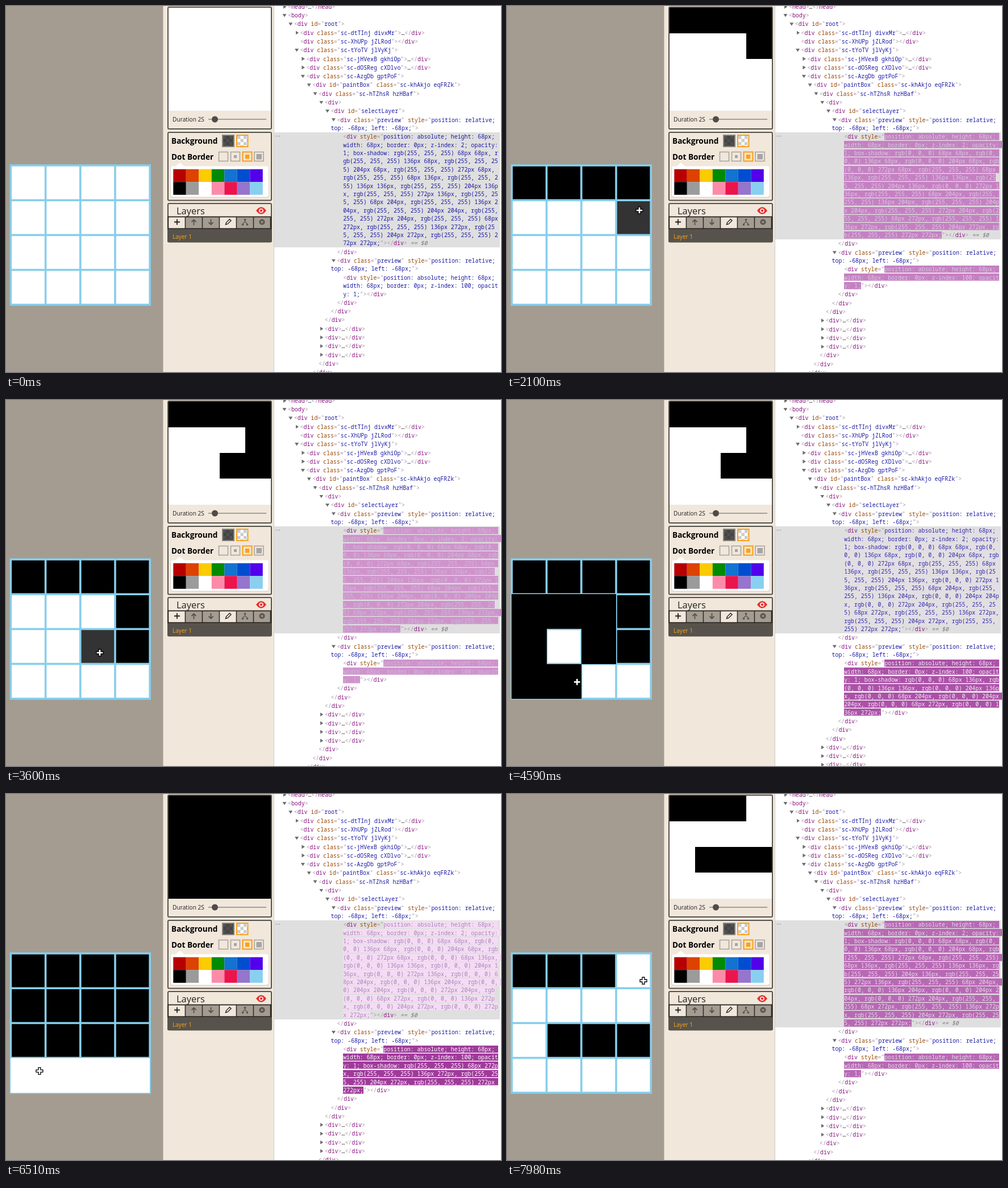
Recreate the animation shown at these times as an HTML page. Size 871x643 px, loop 8000 ms.

```html
<!DOCTYPE html>
<html lang="en">
<head>
<meta charset="utf-8">
<title>Pixel editor with inspector</title>
<style>
html, body { margin: 0; width: 100%; height: 100%; overflow: hidden; background: #fff; }
#stage { position: relative; width: 100%; height: 100%; overflow: hidden; contain: strict; }
#app { position: absolute; left: 0; top: 0; }
#app text { font-family: "Open Sans", "Noto Sans", sans-serif; }
#tree {
  position: absolute; z-index: 0; left: 472px; top: -6.6px; width: 398px;
  font: 9.9px/14.4px "Noto Sans Mono", "DejaVu Sans Mono", monospace;
  white-space: pre-wrap; word-break: break-all; color: #222;
}
.row { position: relative; padding: .45px 0; }
.sel::before { content: ""; position: absolute; z-index: -1; inset: 0 1px 0 0; background: #dfdfdf; }
.sel::after { content: "•••"; position: absolute; left: 2px; top: 0; font-size: 5px; color: #666; }
.flash {
  background: 0 50% / 100% 12.6px no-repeat;
  -webkit-box-decoration-break: clone; box-decoration-break: clone;
}
.arrow { position: absolute; background: #6e6e6e; }
.open { width: 7px; height: 5.5px; margin: 4.8px 0 0 -9.5px; clip-path: polygon(0 0, 100% 0, 50% 100%); }
.shut { width: 5.5px; height: 7px; margin: 3.8px 0 0 -8px; clip-path: polygon(0 0, 100% 50%, 0 100%); }
b, i, u, s { font-weight: 400; font-style: normal; text-decoration: none; }
b { color: #881280; }
s { color: #a894a6; }
i { color: #994500; }
u { color: #1a1aa6; }
em { color: #777; }
</style>
</head>
<body>
<div id="stage">
<svg id="app" width="472" height="643" viewBox="0 0 472 643">
  <defs>
    <pattern id="dark" x="382" y="228" width="11" height="11" patternUnits="userSpaceOnUse">
      <path d="M0 0h11v11H0z" fill="#444"/><path d="M0 0h5.5v5.5H0zM5.5 5.5H11V11H5.5z" fill="#505050"/>
    </pattern>
    <pattern id="light" x="407" y="228" width="11" height="11" patternUnits="userSpaceOnUse">
      <path d="M0 0h11v11H0z" fill="#fff"/><path d="M0 0h5.5v5.5H0zM5.5 5.5H11V11H5.5z" fill="#ccc"/>
    </pattern>
  </defs>
  <rect width="277" height="643" fill="#a49c91"/>
  <rect x="276.5" width="195" height="643" fill="#f1e7db"/>
  <rect x="471" width="1" height="643" fill="#ccc"/>

  <rect x="6.6" y="278.2" width="248.4" height="248.4" fill="#87ceeb"/>
  <g id="cells"></g>
  <g id="strokes" shape-rendering="crispEdges"></g>

  <rect x="286" y="3" width="180" height="180" fill="#fff"/>
  <g id="mini" shape-rendering="crispEdges"></g>
  <g fill="none" stroke="#57524b" stroke-width="2">
    <rect x="285" y="2" width="182" height="214" rx="2"/>
    <rect x="285" y="222" width="182" height="119.500" rx="2"/>
  </g>
  <text x="293" y="203" font-size="10.2" fill="#222">Duration 2S</text>
  <path d="M356 199h102" stroke="#8f8880" stroke-width="1.500"/>
  <circle cx="367.500" cy="199" r="5.500" fill="#4f4b46"/>

  <g font-weight="700" font-size="13.600">
    <text x="291" y="242">Background</text>
    <text x="291" y="270">Dot Border</text>
  </g>
  <g stroke-width="2">
    <rect x="381" y="227" width="20" height="20" fill="url(#dark)" stroke="#8a857d"/>
    <rect x="406" y="227" width="19.500" height="20" fill="url(#light)" stroke="#faa21b"/>
  </g>
  <g fill="none" stroke="#aaa59e" stroke-width="1.600">
    <rect x="374.500" y="256.500" width="16" height="16"/>
    <rect x="395.500" y="256.500" width="16" height="16"/>
    <rect x="437" y="256.500" width="16" height="16"/>
    <rect x="416.500" y="256.500" width="16" height="16" stroke="#faa21b" stroke-width="2.200"/>
  </g>
  <rect x="401" y="262" width="5" height="5" fill="#a5a5a5"/>
  <rect x="420.800" y="261" width="7.500" height="7.500" fill="#faa21b"/>
  <rect x="440.500" y="260" width="9.500" height="9.500" fill="#a5a5a5"/>

  <rect x="289.500" y="282.500" width="173" height="54" rx="4" fill="#d3cac0"/>
  <path d="M298 282l8-7 8 7z" fill="#fff"/>
  <rect x="290" y="281.500" width="172" height="54" rx="4" fill="#fff"/>
  <g id="swatches"></g>

  <rect x="285" y="347" width="182" height="67.500" rx="2" fill="#f1e7db" stroke="#57524b" stroke-width="2"/>
  <text x="300" y="365.500" font-size="16.500" fill="#222">Layers</text>
  <path d="M440 359.500q9-12.500 18 0q-9 12.500-18 0z" fill="#e5322d"/>
  <circle cx="449" cy="359.500" r="3" fill="#e5322d" stroke="#fff" stroke-width="1.600"/>
  <rect x="284" y="369.500" width="183" height="23" fill="#2b2824"/>
  <g id="tools"></g>
  <g fill="none" stroke="#222" stroke-width="1.800">
    <path d="M296 379.500h10M301 374.500v10"/>
    <g stroke="#57524b">
      <path d="M330.500 385v-9.500M326.500 379.500l4-4 4 4M360.500 374.500v9.500M356.500 380l4 4 4-4"/>
      <path d="M420.500 375v4M416.500 384.500l1-3 3-2.500 3 2.500 1 3" stroke-width="1.200"/>
    </g>
    <path d="M386.500 384l1-3.500 6-6 2.500 2.500-6 6z" stroke-width="1.400"/>
  </g>
  <g fill="#57524b">
    <circle cx="420.500" cy="375.500" r="1.800"/><circle cx="416.500" cy="384" r="1.800"/><circle cx="424.500" cy="384" r="1.800"/>
    <circle cx="450.500" cy="379.500" r="5"/>
  </g>
  <path d="M448.500 377.500l4 4m0-4l-4 4" stroke="#a49c91" stroke-width="1.300"/>
  <rect x="284" y="392" width="183" height="23" rx="2" fill="#57534c"/>
  <text x="293" y="408.500" font-size="10.100" fill="#faa21b">Layer 1</text>

  <path id="cursor" d="M-2-6h4v4h4v4h-4v4h-4v-4h-4v-4h4z" fill="#fff" stroke="#000" stroke-width="1.300"/>
</svg>
<div id="tree"></div>
</div>

<script>
const LOOP = 8000, LAG = 40, FLASH = 1400;
const PITCH = 61.2, GX = 8.4, GY = 280, MINI = 45.2;
const BLACK = '0, 0, 0', WHITE = '255, 255, 255';
const $ = id => document.getElementById(id);

// cursor way points: time, x, y
const path = [
  [380, 12, 315], [620, 36, 316], [1000, 110, 316], [1270, 193, 316], [1390, 228, 318],
  [1470, 232, 340], [1500, 233, 359], [2150, 233, 359], [2400, 226, 425], [2780, 222, 440],
  [3080, 165, 444], [3740, 165, 444], [3860, 160, 372], [4030, 100, 368], [4200, 42, 372],
  [4330, 38, 433], [4450, 42, 492], [4620, 140, 496], [4760, 215, 494], [5000, 100, 470],
  [5120, 87, 444], [5450, 87, 444], [5900, 200, 480], [6080, 226, 492], [6140, 226, 492],
  [6300, 161, 492], [6440, 75, 488], [6510, 59, 487], [6630, 52, 435], [6760, 46, 375],
  [6880, 56, 370], [7080, 120, 368], [7300, 215, 368], [7400, 226, 350], [7480, 236, 330],
  [7560, 240, 328]
];
const presses = [
  { down: 560, up: 1910, color: BLACK },
  { down: 2420, up: 2520, color: BLACK },
  { down: 3240, up: 3330, color: BLACK },
  { down: 3720, up: 5400, color: BLACK },
  { down: 6120, up: 7870, color: WHITE }
];

function cursorAt(t) {
  const n = path.findIndex(p => p[0] > t);
  if (n === 0) return null;
  if (n < 0) return path[path.length - 1].slice(1);
  const a = path[n - 1], b = path[n], k = (t - a[0]) / (b[0] - a[0]);
  return [a[1] + (b[1] - a[1]) * k, a[2] + (b[2] - a[2]) * k];
}

function cellAt([x, y]) {
  const c = Math.floor((x - GX) / PITCH), r = Math.floor((y - GY) / PITCH);
  return c < 0 || r < 0 || c > 3 || r > 3 ? -1 : r * 4 + c;
}

// cells met while the button is held
for (const p of presses) {
  p.cells = new Map();
  for (let t = p.down; t < p.up; t += 5) {
    const cell = cellAt(cursorAt(t));
    if (cell >= 0 && !p.cells.has(cell)) p.cells.set(cell, t);
  }
}

function rects(id, n, make) {
  const group = $(id);
  return Array.from({ length: n }, (_, i) => {
    const el = document.createElementNS('http://www.w3.org/2000/svg', 'rect');
    const [x, y, w, h, fill] = make(i);
    for (const [k, v] of Object.entries({ x, y, width: w, height: h, fill })) el.setAttribute(k, v);
    return group.appendChild(el);
  });
}
const col = i => i % 4, line = i => i >> 2;
const cells = rects('cells', 16, i => [GX + col(i) * PITCH + 1.8, GY + line(i) * PITCH + 1.8, 57.6, 57.6, '#fff']);
const strokes = rects('strokes', 16, i => [GX + col(i) * PITCH, GY + line(i) * PITCH, PITCH, PITCH, 'none']);
const mini = rects('mini', 16, i => [285.6 + col(i) * MINI, 2.7 + line(i) * MINI, MINI, MINI, '#fff']);
const colors = ('#b70000 #dd4200 #fccb00 #008b02 #1273d0 #004dcf #5300eb ' +
  '#000 #9b9b9b #fff #fc8ba9 #eb144c #9575cd #89cff0').split(' ');
rects('swatches', 14, i => [294.3 + i % 7 * 22.5, i < 7 ? 286.7 : 309.2, 22.5, 22.5, colors[i]]);
rects('tools', 6, i => [286.2 + i * 30, 371.3, 28.5, 19, i % 3 ? '#a49c91' : '#f1e7db']);

// inspector tree
const attr = (name, value) => ` <i>${name}</i><s>="</s><u>${value}</u><s>"</s>`;
const tag = (attrs = '') => `<s>&lt;</s><b>div</b>${attrs}<s>&gt;</s>`;
const END = '<s>&lt;/</s><b>div</b><s>&gt;</s>';
function row(depth, html, arrow = '', cls = '') {
  const x = 24 + 10.8 * depth, wrap = arrow ? 10.8 : 0;
  const mark = arrow && `<span class="arrow ${arrow}"></span>`;
  return `<div class="row ${cls}" style="padding-left:${x - wrap}px;text-indent:${wrap}px">${mark}${html}</div>`;
}
const cls = name => attr('class', name);
const shut = (depth, attrs) => row(depth, tag(attrs) + '…' + END, 'shut');
const open = (depth, attrs) => row(depth, tag(attrs), 'open');
const end = depth => row(depth, END);
const layer = (id, name, tail) =>
  open(8, cls('preview') + attr('style', 'position: relative; top: -68px; left: -68px;')) +
  row(9, tag(attr('style', `<span class="flash" id="${id}"></span>`)) + '<wbr>' + END + tail, '', name) + end(8);

$('tree').innerHTML =
  row(0, '<s>&lt;</s><b>head</b><s>&gt;</s>…<s>&lt;/</s><b>head</b><s>&gt;</s>', 'shut') +
  row(0, '<s>&lt;</s><b>body</b><s>&gt;</s>', 'open') +
  open(1, attr('id', 'root')) +
  shut(2, cls('sc-dtTInj divxMr')) +
  row(2, tag(cls('sc-XhUPp jZLRod')) + END) +
  open(2, cls('sc-tYoTV jlVyKj')) +
  shut(3, cls('sc-jHVexB gkhiOp')) +
  shut(3, cls('sc-dOSReg cXDlvo')) +
  open(3, cls('sc-AzgDb gptPoF')) +
  open(4, attr('id', 'paintBox') + cls('sc-khAkjo eqFRZk')) +
  open(5, cls('sc-hTZhsR hzHBaf')) +
  open(6) +
  open(7, attr('id', 'selectLayer')) +
  layer('base', 'sel', ' <em>== $0</em>') +
  layer('draft', '', '') +
  end(7) + end(6) + shut(6).repeat(4) + end(5) + end(4) + end(3);

function styleText(z, shadow) {
  const list = shadow.map(([i, rgb]) => `rgb(${rgb}) ${68 * (col(i) + 1)}px ${68 * (line(i) + 1)}px`);
  return `position: absolute; height: 68px; width: 68px; border: 0px; z-index: ${z}; opacity: 1;` +
    (list.length ? ` box-shadow: ${list.join(', ')};` : '');
}

// cubic-bezier(0, 0, .2, 1)
function ease(x) {
  let lo = 0, hi = 1;
  for (let n = 0; n < 20; n++) {
    const s = (lo + hi) / 2;
    if (.6 * s * s * (1 - s) + s * s * s < x) lo = s; else hi = s;
  }
  return 3 * lo * lo * (1 - lo) + lo * lo * lo;
}
const mix = (a, b, k) => a.map((v, i) => Math.round(v + (b[i] - v) * k));

// the changed value flashes purple, then fades back
function show(id, text, age) {
  const el = $(id), k = age / FLASH;
  if (el.textContent !== text) el.textContent = text;
  if (k >= 1) { el.style.cssText = ''; return; }
  const fade = ease(Math.min(1, k / .8)), out = k < .8 ? 0 : ease((k - .8) / .2);
  const back = `rgba(${mix([158, 54, 153], [245, 219, 244], fade)},${1 - out})`;
  const ink = mix(mix([255, 255, 255], [165, 135, 185], fade), [26, 26, 166], out);
  el.style.backgroundImage = `linear-gradient(${back}, ${back})`;
  el.style.color = `rgb(${ink})`;
}

function draw(t) {
  const done = Array(16).fill(WHITE);
  let saved = -1e4, changed = -1e4, held = null;
  for (const p of presses) {
    if (t >= p.up) {
      p.cells.forEach((_, i) => done[i] = p.color);
      saved = changed = p.up;
    } else if (t >= p.down) held = p;
  }
  const listed = [], live = new Map();
  if (held) held.cells.forEach((at, i) => {
    if (t >= at) live.set(i, held.color);
    if (t >= at + LAG) {
      listed.push([i, held.color]);
      changed = Math.max(changed, at + LAG);
    }
  });
  listed.sort((a, b) => a[0] - b[0]);

  const pos = cursorAt(t), over = pos ? cellAt(pos) : -1;
  done.forEach((rgb, i) => {
    const fill = `rgb(${rgb})`;
    cells[i].setAttribute('fill', i === over && rgb === BLACK ? '#333' : fill);
    mini[i].setAttribute('fill', fill);
    strokes[i].setAttribute('fill', live.has(i) ? `rgb(${live.get(i)})` : 'none');
  });
  $('cursor').setAttribute('visibility', pos ? 'visible' : 'hidden');
  if (pos) $('cursor').setAttribute('transform', `translate(${pos})`);

  show('base', styleText(2, done.map((rgb, i) => [i, rgb])), t - saved);
  show('draft', styleText(100, listed), t - changed);
}

const start = performance.now();
function tick() {
  draw((performance.now() - start) % LOOP);
  requestAnimationFrame(tick);
}
tick();
</script>
</body>
</html>
```
